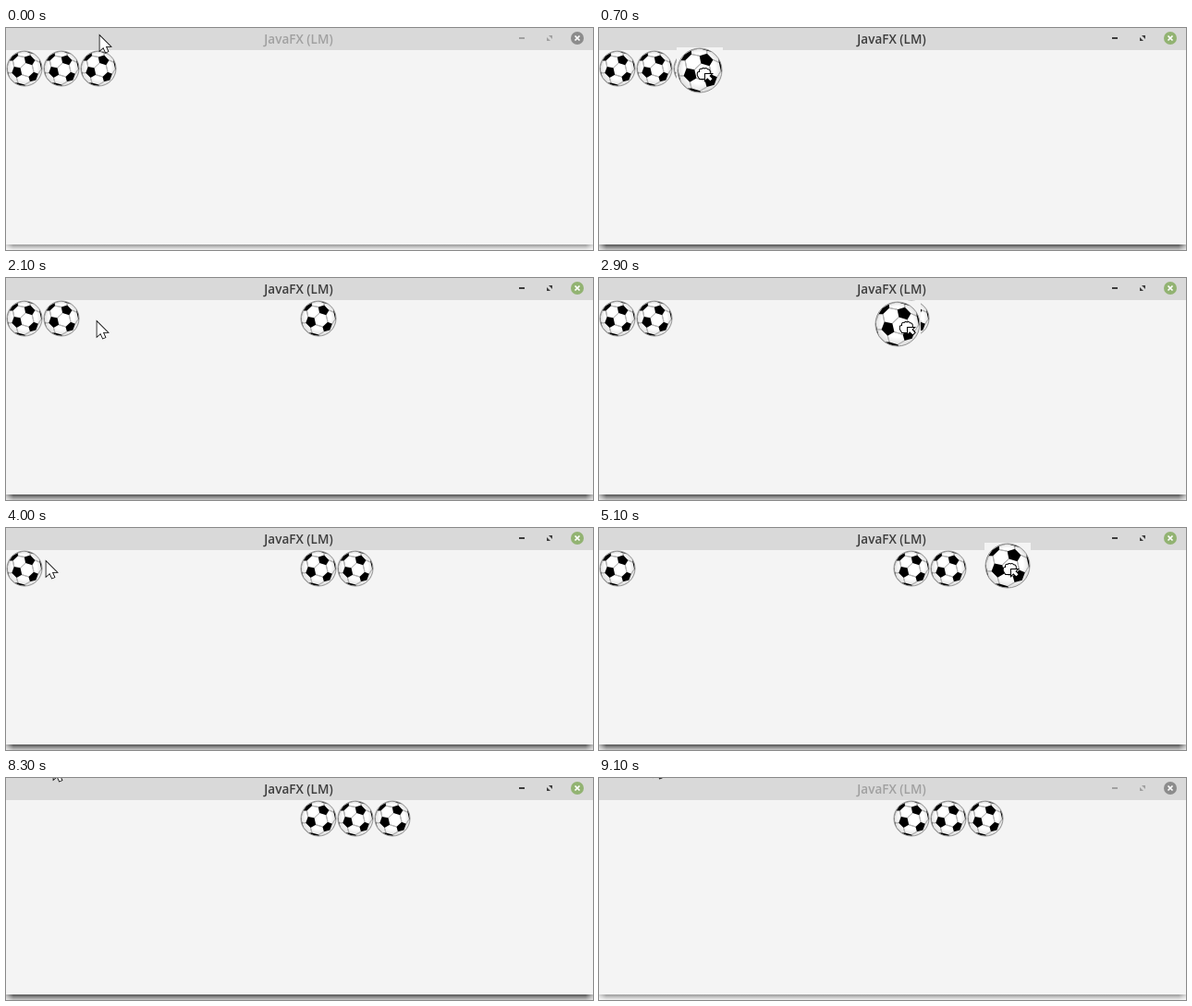
An HTML page with a canvas for the animation above (9.4 s loop, 635 by 241 pixels).

```html
<!DOCTYPE html>
<html lang="en">
<head>
<meta charset="utf-8">
<title>JavaFX (LM)</title>
<style>
  html, body { margin: 0; width: 100%; height: 100%; overflow: hidden; background: #fff; }
  canvas { display: block; }
</style>
</head>
<body>
<canvas id="stage" width="635" height="241"></canvas>
<script>
const ctx = document.getElementById('stage').getContext('2d');
const LOOP = 9400, STEP = 100;
const BODY = '#f4f4f4';

// The pointer eases to each goal in turn and rests in between; sag bows the path downwards
const pointerStart = { x: 101, y: 8 };
const moves = [
  { start: 0, end: 400, x: 98, y: 48 },
  { start: 600, end: 1300, x: 346, y: 59 },
  { start: 1400, end: 2300, x: 62, y: 45 },
  { start: 2400, end: 3130, x: 414, y: 49, sag: 6 },
  { start: 3300, end: 4000, x: 43, y: 36 },
  { start: 4100, end: 4400, x: 18, y: 46 },
  { start: 4400, end: 5100, x: 443, y: 44 },
  { start: 5200, end: 5400, x: 441, y: 40 },
  { start: 5500, end: 5900, x: 240, y: -30 },
  { start: 5900, end: 8200, x: 46, y: -22 },
  { start: 8200, end: 8600, x: 79, y: 22 },
  { start: 8600, end: 8900, x: 59, y: -18 }
];

// Each drag moves a ball from a left slot to the next free right slot
const drags = [
  { start: 700, drop: 1500, from: 2, grabX: 28 },
  { start: 2600, drop: 3400, from: 1, grabX: 33 },
  { start: 4500, drop: 5300, from: 0, grabX: 26 }
];
const GRAB_Y = 28;

function pointerAt(t) {
  let { x, y } = pointerStart;
  for (const move of moves) {
    const u = Math.min(1, Math.max(0, (t - move.start) / (move.end - move.start)));
    const eased = u * u * (3 - 2 * u);
    x += (move.x - x) * eased;
    y += (move.y - y) * eased + (move.sag || 0) * Math.sin(Math.PI * u);
  }
  return [Math.round(x), Math.round(y)];
}

// Vector helpers
const dot = (a, b) => a[0] * b[0] + a[1] * b[1] + a[2] * b[2];
const mix = (a, p, b, q) => a.map((v, i) => v * p + b[i] * q);
const unit = v => v.map(c => c / Math.hypot(...v));
const cross = (a, b) => [a[1] * b[2] - a[2] * b[1], a[2] * b[0] - a[0] * b[2], a[0] * b[1] - a[1] * b[0]];

// A football is a truncated icosahedron: black patches sit on the icosahedron's corners
function buildFootball() {
  const pole = unit([0.3, -0.51, 0.8]), hint = [-0.48, 0.24, 0.84];
  const u = unit(mix(hint, 1, pole, -dot(hint, pole))), w = cross(pole, u);
  const half = [pole];
  for (let k = 0; k < 5; k++) {
    const a = k * Math.PI * 0.4;
    const side = mix(u, Math.cos(a), w, Math.sin(a));
    half.push(mix(pole, 1 / Math.sqrt(5), side, 2 / Math.sqrt(5)));
  }
  const corners = half.concat(half.map(v => v.map(c => -c)));
  const patches = [], seams = [];
  for (const v of corners) {
    const near = corners.filter(n => dot(v, n) > 0.4 && dot(v, n) < 0.5);
    const rim = near.map(n => unit(mix(v, 2, n, 1)));
    near.forEach((n, i) => {
      const other = unit(mix(v, 1, n, 2));
      if (rim[i][2] > 0 && other[2] > 0) seams.push([rim[i], other]);
    });
    if (!rim.some(p => p[2] > 0)) continue;
    const flat = rim.map(([x, y, z]) => {
      const r = z < 0 ? Math.hypot(x, y) : 1;
      return [x / r, y / r];
    });
    const cx = flat.reduce((s, p) => s + p[0], 0) / 5, cy = flat.reduce((s, p) => s + p[1], 0) / 5;
    const angle = p => Math.atan2(p[1] - cy, p[0] - cx);
    patches.push(flat.sort((a, b) => angle(a) - angle(b)));
  }
  return { patches, seams };
}
const football = buildFootball();

function polygon(points) {
  ctx.beginPath();
  points.forEach(([x, y]) => ctx.lineTo(x, y));
  ctx.closePath();
}

function disc(x, y, r) {
  ctx.beginPath();
  ctx.arc(x, y, r, 0, 2 * Math.PI);
}

function drawBall(cx, cy, r) {
  ctx.save();
  ctx.translate(cx, cy);
  ctx.scale(r, r);
  const shade = ctx.createRadialGradient(0, -0.1, 0.7, 0, 0, 1);
  shade.addColorStop(0, '#fff');
  shade.addColorStop(1, '#dedede');
  ctx.fillStyle = shade;
  disc(0, 0, 1);
  ctx.fill();
  ctx.save();
  ctx.clip();
  ctx.lineWidth = 0.7 / r;
  ctx.strokeStyle = '#b4b4b4';
  for (const seam of football.seams) {
    polygon(seam);
    ctx.stroke();
  }
  ctx.fillStyle = '#000';
  for (const patch of football.patches) {
    polygon(patch);
    ctx.fill();
  }
  ctx.restore();
  disc(0, 0, 1);
  ctx.lineWidth = 0.9 / r;
  ctx.strokeStyle = '#888';
  ctx.stroke();
  ctx.restore();
}

function rect(color, x, y, w, h) {
  ctx.fillStyle = color;
  ctx.fillRect(x, y, w, h);
}

function drawWindow(active) {
  rect('#fff', 0, 0, 635, 241);
  const shadow = ctx.createLinearGradient(0, 235, 0, 241);
  shadow.addColorStop(0, active ? '#525252' : '#999');
  shadow.addColorStop(1, active ? '#cacaca' : '#f2f2f2');
  rect(shadow, 0, 235, 635, 6);
  for (const [edge, inner] of [[0, 8], [635, 627]]) {
    const fade = ctx.createLinearGradient(edge, 0, inner, 0);
    fade.addColorStop(0, 'rgba(255,255,255,.6)');
    fade.addColorStop(1, 'rgba(255,255,255,0)');
    rect(fade, Math.min(edge, inner), 235, 8, 6);
  }
  rect('#d9d9d9', 0, 0, 635, 24);
  rect(BODY, 0, 24, 635, 211);

  ctx.fillStyle = active ? '#3c3c3c' : '#a0a0a0';
  ctx.font = '600 13.5px "Open Sans", "Noto Sans", sans-serif';
  ctx.textAlign = 'center';
  ctx.fillText('JavaFX (LM)', 316.5, 17);
  ctx.fillRect(555, 10, 6, 2);
  polygon([[587, 8], [591, 8], [591, 12]]);
  ctx.fill();
  polygon([[585, 10], [585, 14], [589, 14]]);
  ctx.fill();

  ctx.fillStyle = active ? '#92b372' : '#8c8c8c';
  disc(618, 11, 7);
  ctx.fill();
  ctx.strokeStyle = '#fff';
  ctx.lineWidth = 1.7;
  ctx.beginPath();
  ctx.moveTo(615.5, 8.5); ctx.lineTo(620.5, 13.5);
  ctx.moveTo(620.5, 8.5); ctx.lineTo(615.5, 13.5);
  ctx.stroke();
}

function paint(path, width) {
  ctx.fillStyle = '#fff';
  ctx.strokeStyle = '#000';
  ctx.lineWidth = width;
  ctx.stroke(path);
  ctx.fill(path);
}

const arrow = new Path2D('M.5 .5V16.5L4.3 13L6.8 18.5L9.4 17.4L7 12H12Z');
const fist = new Path2D('M3 12L.8 8.5V6Q.8 4.8 3 5V3Q3.2 1.2 5.3 2Q6.5 .2 8.3 1.4Q10.3 .5 11.2 2.3Q13.5 1.8 13.8 4V8.5L12.3 12Z');
const badge = new Path2D('M9 7H15.5L13.4 9L16.5 12.2L14.4 14.3L11.2 11.2L9 13.5Z');

function drawPointer(x, y, grabbing) {
  ctx.save();
  if (grabbing) {
    ctx.translate(x - 6, y - 6);
    paint(fist, 2);
    paint(badge, 2);
  } else {
    ctx.translate(x, y);
    paint(arrow, 1.6);
  }
  ctx.restore();
}

function render(now) {
  const t = Math.floor(now % LOOP / STEP) * STEP;
  const [x, y] = pointerAt(t);
  drawWindow(t >= 600 && t < 9100);
  drags.forEach(({ drop, from }, i) => {
    drawBall(t < drop ? 20 + 40 * from : 338 + 40 * i, 44, 19);
  });
  const held = drags.find(d => t >= d.start && t < d.drop);
  if (held) {
    const left = x - held.grabX, top = y - GRAB_Y;
    rect(BODY, left, top, 50, 49);
    drawBall(left + 25, top + 25, 24);
  }
  drawPointer(x, y, Boolean(held));
}

const start = performance.now();
function tick() {
  render(performance.now() - start);
  requestAnimationFrame(tick);
}
tick();
</script>
</body>
</html>
```
